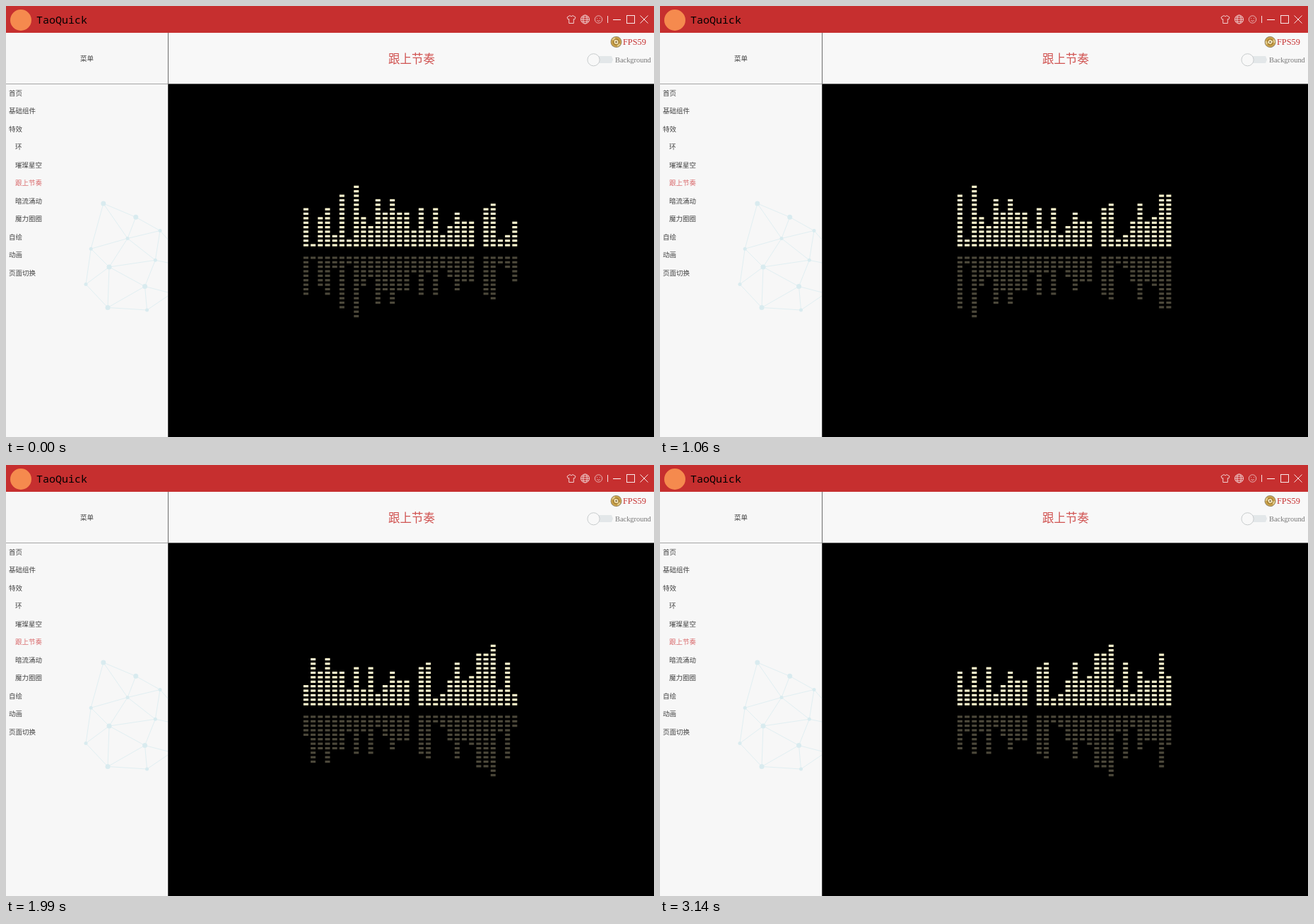
An HTML page with a canvas that plays this animation: 917x611 px, repeating every 3220 ms.

```html
<!DOCTYPE html>
<html lang="zh-CN">
<head>
<meta charset="utf-8">
<title>TaoQuick</title>
<style>
  html, body { margin: 0; width: 100%; height: 100%; overflow: hidden; background: #f7f7f7; }
  #stage { position: absolute; left: 0; top: 0; width: 917px; height: 611px; overflow: hidden; }
  canvas { position: absolute; left: 0; top: 0; }
  .text {
    position: absolute; white-space: nowrap; color: #444;
    font: 300 9.5px/20px "Noto Sans CJK SC", "Noto Sans CJK", sans-serif;
  }
  .centre { transform: translateX(-50%); }
  .brand { font: 15px/20px "Noto Sans Mono", monospace; color: #000; }
  .title { font-size: 16.5px; color: #d05250; }
  .on { color: #d96a6c; }
  .fps { font: 12.3px/20px "Liberation Serif", serif; color: #c62f2f; }
  .note { font: 10.4px/20px "Liberation Serif", serif; color: #777; }
</style>
</head>
<body>
<div id="stage"><canvas id="view" width="917" height="611"></canvas></div>
<script>
const LOOP = 3220, SPIN = 800, TAU = Math.PI * 2;
const COUNT = 30, BEAT = 230, LEAD = 100;
const SCALE = 917 / 1440; // the window is laid out 1440 units wide
const EDGE = 360 * SCALE;
const REACH = 66.75;
const stage = document.getElementById('stage');
const ctx = document.getElementById('view').getContext('2d');

// Bar heights in rows; a window of COUNT values slides one place per beat.
const levels = [
  9, 1, 7, 9, 3, 12, 2, 14, 7, 5, 11, 8, 11, 8, 8, 4, 9, 4, 9, 3, 5, 8,
  6, 6, 0, 9, 10, 2, 3, 6, 10, 6, 7, 12, 12, 14, 4, 10, 3, 8, 6, 6, 12, 7
];

// Five large nodes, then the small ones.
const nodes = [
  [137.8, 280], [183.7, 299.3], [146, 370], [196.5, 397.5], [144, 427.5],
  [218, 318.5], [172, 329.5], [120.2, 344.2], [211.3, 360.3], [113, 394.5], [199.5, 431]
];

function label(str, x, y, cls = '') {
  const el = document.createElement('div');
  el.className = 'text ' + cls;
  el.textContent = str;
  el.style.left = x + 'px';
  el.style.top = y - 10 + 'px';
  stage.append(el);
}

function rect(x, y, w, h, fill) {
  ctx.fillStyle = fill;
  ctx.fillRect(x, y, w, h);
}

function disc(x, y, r, fill) {
  ctx.fillStyle = fill;
  ctx.beginPath();
  ctx.arc(x, y, r, 0, TAU);
  ctx.fill();
}

function ring(x, y, rx, ry, colour, from = 0, to = TAU) {
  ctx.strokeStyle = colour;
  ctx.lineWidth = 1;
  ctx.beginPath();
  ctx.ellipse(x, y, rx, ry, 0, from, to);
  ctx.stroke();
}

function line(points, colour) {
  ctx.strokeStyle = colour;
  ctx.lineWidth = 1;
  ctx.beginPath();
  points.forEach(p => ctx.lineTo(...p));
  ctx.stroke();
}

function drawPanels() {
  rect(0, 0, 917, 611, '#f7f7f7');
  rect(230, 38, 687, 72, '#f8f8f8');
  rect(0, 0, 917, 38, '#c62f2f');
  rect(0, 110, 917, 1, '#a6a6a6');
  rect(229, 38, 1, 72, '#6e6e6e');
  rect(EDGE, 110.6, 917 - EDGE, 501, '#000');
  disc(21, 20, 15, '#f58a4e');
}

function drawNet() {
  const colour = '#e1eff2';
  nodes.forEach((a, i) => {
    for (const b of nodes.slice(i + 1)) {
      if (Math.hypot(a[0] - b[0], a[1] - b[1]) < REACH) line([a, b], colour);
    }
  });
  // Threads that leave through the panel's right edge.
  [[5, 331], [8, 364], [3, 406], [10, 411]].forEach(([n, y]) => line([nodes[n], [229, y]], colour));
  nodes.forEach(([x, y], i) => disc(x, y, i < 5 ? 3.5 : 2.5, '#d9ebef'));
}

function drawWindowIcons() {
  const pale = '#f0cfcf', faint = '#e8b4b4', bright = '#f8e8e8';

  const side = [[2, 13.5], [6, 16], [4.7, 19], [3.3, 18.5], [3.3, 24.5], [0, 24.5]];
  for (const s of [-1, 1]) {
    line([[0, 15], ...side].map(([x, y]) => [800 + s * x, y]), pale);
  }

  for (const rx of [6, 2.8]) ring(819.5, 19, rx, 6, pale);
  for (const dy of [-3, 0, 3]) {
    const half = Math.sqrt(36 - dy * dy);
    line([[819.5 - half, 19 + dy], [819.5 + half, 19 + dy]], pale);
  }

  ring(838.5, 19, 5.2, 5.2, faint);
  ring(838.5, 19, 2.4, 2.4, faint, 0.4, Math.PI - 0.4);
  for (const s of [-2, 2]) disc(838.5 + s, 17.5, 0.6, faint);

  rect(851, 14, 1, 10, '#f6e2e2');
  rect(859, 19, 11, 1, '#fff');
  ctx.strokeStyle = bright;
  ctx.strokeRect(878.5, 13.5, 11, 11);
  for (const s of [-5.5, 5.5]) line([[903 - s, 13.5], [903 + s, 24.5]], bright);
}

function drawToggle() {
  rect(832, 71, 25, 10, '#e3e7e9');
  ctx.beginPath();
  ctx.moveTo(857, 71);
  ctx.lineTo(859, 76);
  ctx.lineTo(857, 81);
  ctx.fill();
  disc(831.5, 76.3, 8.6, '#f8f8f8');
  ring(831.5, 76.3, 8.6, 8.6, '#c8cccd');
}

function drawSpinner(t) {
  ctx.save();
  ctx.translate(863.5, 51);
  ctx.rotate(t / SPIN * TAU);
  disc(0, 0, 8, '#8e8570');
  disc(0, 0, 7.2, '#c9a14a');
  ctx.fillStyle = '#e6cf8e';
  for (const a of [0.5, 0.5 + Math.PI]) {
    ctx.beginPath();
    ctx.moveTo(0, 0);
    ctx.arc(0, 0, 6.8, a, a + 0.8);
    ctx.fill();
  }
  ring(0, 0, 4, 4, '#94712c');
  disc(0, 0, 2.8, '#efe3bd');
  disc(0, 0, 1.2, '#7d6844');
  ctx.restore();
}

function drawBars(t) {
  const shift = Math.floor((t + LEAD) / BEAT);
  ctx.save();
  ctx.scale(SCALE, SCALE);
  for (let i = 0; i < COUNT; i++) {
    const x = 661 + i * 16;
    for (let r = 0; r < levels[i + shift]; r++) {
      rect(x, 530 - r * 10, 11, 5, '#fff8cf');
      rect(x, 558 + r * 10, 11, 5, '#4c483a');
    }
  }
  ctx.restore();
}

const start = performance.now();
function frame() {
  const t = (performance.now() - start) % LOOP;
  drawPanels();
  drawNet();
  drawWindowIcons();
  drawToggle();
  drawSpinner(t);
  drawBars(t);
  requestAnimationFrame(frame);
}

label('TaoQuick', 43, 18.5, 'brand');
label('菜单', 114.5, 74, 'centre');
label('跟上节奏', 574, 74, 'centre title');
label('FPS59', 873, 51, 'fps');
label('Background', 862, 76.5, 'note');

// A leading dash marks a nested entry.
['首页', '基础组件', '特效', '-环', '-璀璨星空', '-跟上节奏', '-暗流涌动', '-魔力圈圈', '自绘', '动画', '页面切换']
  .forEach((item, i) => {
    const nested = item[0] === '-';
    label(item.replace('-', ''), nested ? 13 : 4, 123 + i * 25.45, i === 5 ? 'on' : '');
  });

frame();
</script>
</body>
</html>
```
